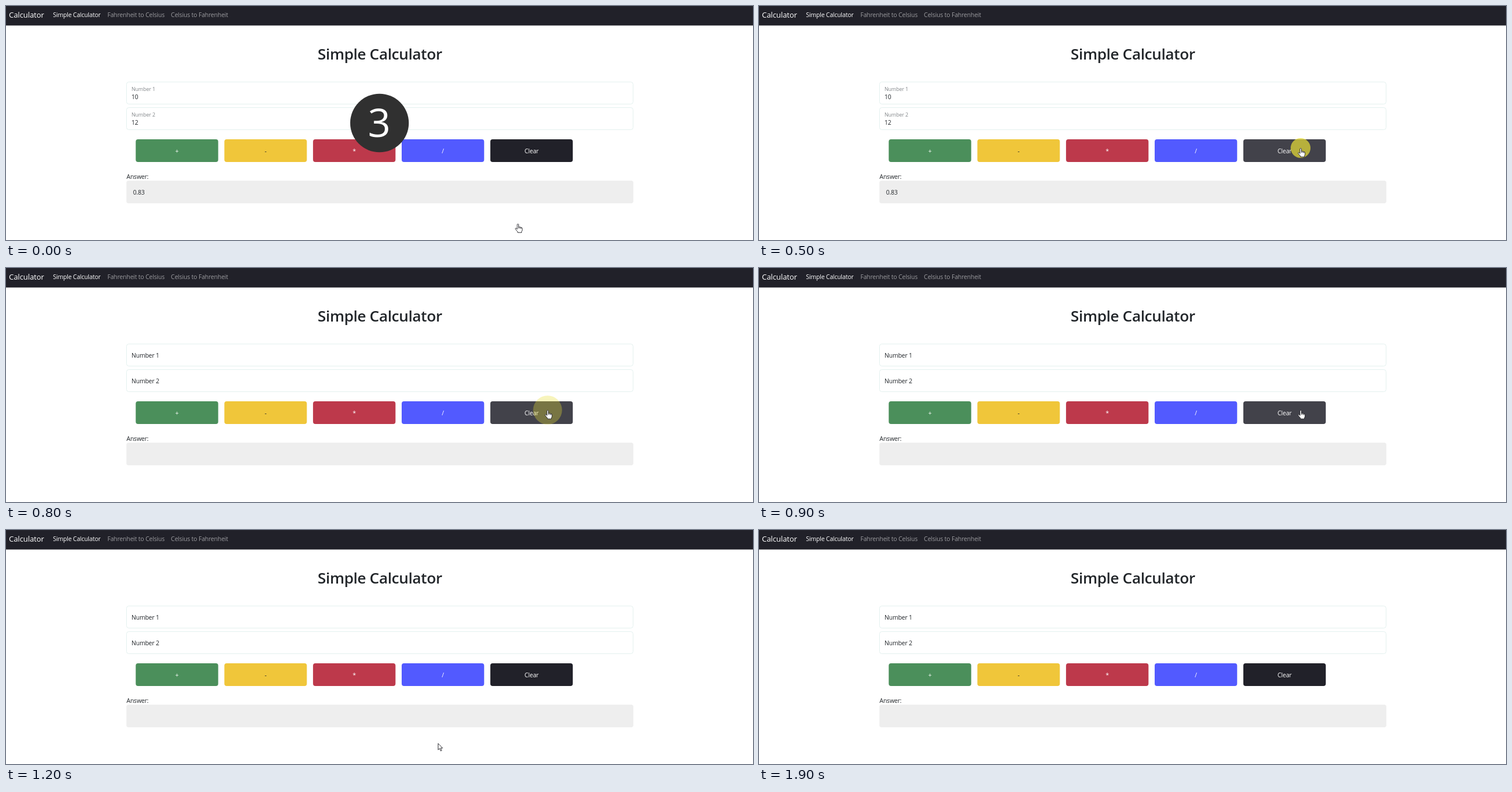
An HTML page that plays this animation: 1280x402 px, repeating every 2000 ms.

```html
<!DOCTYPE html>
<html lang="en">
<head>
<meta charset="utf-8">
<title>Simple Calculator</title>
<style>
  html, body { margin: 0; width: 100%; height: 100%; overflow: hidden; background: #fff; }
  svg { display: block; width: 1280px; height: 402px; }
  text { font: 10.4px "Open Sans", "Noto Sans", sans-serif; letter-spacing: -.016em; fill: #212529; }
  .brand { font-size: 13.1px; letter-spacing: -.01em; fill: #fff; }
  .nav { fill: #9b9b9f; }
  .on { fill: #fff; }
  .mid { text-anchor: middle; }
  .title { font-size: 26px; font-weight: 600; letter-spacing: -.014em; }
  .small { font-size: 8.9px; fill: #84888b; }
  .count { font-size: 68px; letter-spacing: 0; fill: #fff; }
  .field { fill: #fff; stroke: #e4f1ef; }
  .cursor { fill: #fff; stroke: #1c1c22; stroke-linejoin: round; }
</style>
</head>
<body>
<svg id="stage" viewBox="0 0 1280 402">
  <rect width="1280" height="33.5" fill="#212129"/>
  <text class="brand" x="5" y="20">Calculator</text>
  <text class="nav on" x="80.5" y="18.8">Simple Calculator</text>
  <text class="nav" x="173.7" y="18.8">Fahrenheit to Celsius</text>
  <text class="nav" x="282.5" y="18.8">Celsius to Fahrenheit</text>
  <text class="title mid" x="640.7" y="92.3">Simple Calculator</text>

  <rect class="field" x="206.5" y="130.5" width="868" height="38" rx="4"/>
  <rect class="field" x="206.5" y="174.5" width="868" height="38" rx="4"/>
  <rect x="206.3" y="300" width="868.7" height="39" rx="4" fill="#eee"/>
  <text x="206.5" y="296.5">Answer:</text>

  <g id="filled">
    <text class="small" x="215" y="145.5">Number 1</text>
    <text x="215" y="159.7">10</text>
    <text class="small" x="215" y="189.5">Number 2</text>
    <text x="215" y="203.7">12</text>
    <text x="217.7" y="324">0.83</text>
  </g>
  <g id="empty">
    <text x="215" y="153.5">Number 1</text>
    <text x="215" y="197.5">Number 2</text>
  </g>

  <g id="buttons"></g>

  <g id="counter">
    <circle cx="640" cy="201" r="50.2" fill="#303030"/>
    <text class="count mid" x="639.5" y="225">3</text>
  </g>
  <circle id="ripple" cx="928" cy="244" fill="#e5dc36"/>
  <path id="hand" class="cursor" stroke-width=".9"
    d="M-1.2 1Q-1.2 0 0 0T1.3 1V5.2Q2.5 4.3 3.5 5.4Q4.7 4.7 5.4 5.9Q7.4 5.7 7.4 7.6V10Q7.4 11.6 6.3 13V14.6H-.4V13.2Q-2.2 11.6-4.2 8.6Q-4.8 7.3-3.6 7Q-2.6 6.9-1.2 8.8ZM1.3 5.2V7.6M3.5 5.4V7.7M5.4 5.9V8"/>
  <path id="arrow" class="cursor" stroke-width=".9"
    d="M.4 .4V11.4L3 9L4.8 13.3L6.6 12.5L4.8 8.4H8.2Z"/>
</svg>
<script>
const el = id => document.getElementById(id);
const show = (id, on) => el(id).style.display = on ? "" : "none";

const buttons = [
  ["+", "#4b8f5b", "#fff"],
  ["-", "#f0c63a", "#212529"],
  ["*", "#bd394b", "#fff"],
  ["/", "#525aff", "#fff"],
  ["Clear", "#212129", "#fff"]
];
el("buttons").innerHTML = buttons.map(([label, fill, ink], i) => {
  const x = 222.3 + i * 151.9;
  return `<rect x="${x}" y="229" width="141.3" height="39" rx="4" fill="${fill}"/>
    <text class="mid" x="${x + 70.6}" y="252.6" style="fill:${ink}">${label}</text>`;
}).join("");
const clearBox = el("buttons").querySelector("rect:last-of-type");

// start time, cursor shape, cursor x, cursor y
const moves = [
  [0, "hand", 877.2, 374.6],
  [100, "hand", 928.2, 244.6],
  [1100, "arrow", 850, 318],
  [1200, "arrow", 740, 366.3],
  [1300, "arrow", 722, 389],
  [1400, "", 0, 0]
];
const LOOP = 2000, STEP = 100;

function draw(ms) {
  const t = Math.floor(ms / STEP) * STEP;
  const [, shape, x, y] = moves.filter(m => m[0] <= t).pop();
  for (const id of ["hand", "arrow"]) {
    show(id, id === shape);
    el(id).setAttribute("transform", `translate(${x} ${y})`);
  }
  show("counter", t < 100);
  show("filled", t < 600);
  show("empty", t >= 600);
  clearBox.setAttribute("fill", t >= 100 && t < 1100 ? "#42424a" : "#212129");

  // click highlight grows while it fades
  const age = (t - 500) / STEP;
  show("ripple", age >= 0 && age < 4);
  el("ripple").setAttribute("r", Math.max(0, 17 + 2.6 * age));
  el("ripple").setAttribute("opacity", .72 - .13 * age);
}

const start = performance.now();
function tick() {
  draw((performance.now() - start) % LOOP);
  requestAnimationFrame(tick);
}
tick();
</script>
</body>
</html>
```
